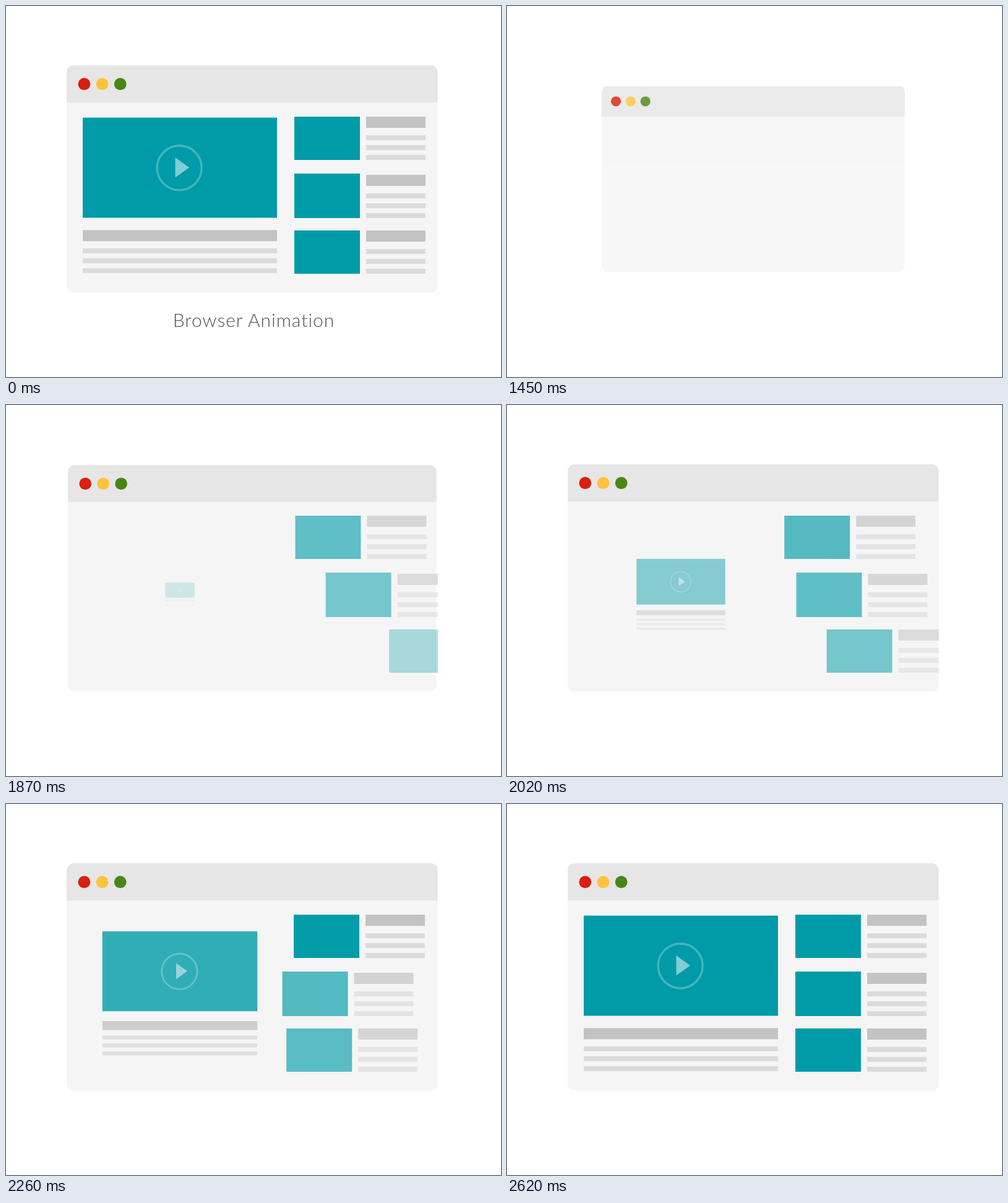
Write an HTML page that moves like this. It is 800x600 px and loops after 3650 ms.

```html
<!DOCTYPE html>
<html lang="en">
<head>
<meta charset="utf-8">
<title>Browser Animation</title>
<style>
  html, body { margin: 0; width: 100%; height: 100%; overflow: hidden; background: #fff; }
  svg { display: block; width: 800px; height: 600px; }
  .teal { fill: #009ba8; }
  .heading { fill: #c3c3c3; }
  .line { fill: #dbdbdb; }
  #title { font: 300 30px Lato, "Open Sans", sans-serif; letter-spacing: 1px; fill: #4a5248; text-anchor: middle; }
</style>
</head>
<body>
<svg viewBox="0 0 800 600">
  <clipPath id="page"><rect x="98" y="96" width="600" height="368"/></clipPath>
  <g id="browser">
    <rect x="98.2" y="96" width="599.4" height="367.6" rx="11" fill="#f5f5f5"/>
    <path d="M98.2 156V107a11 11 0 0 1 11-11H686.6a11 11 0 0 1 11 11V156Z" fill="#e6e6e6"/>
    <circle cx="126.4" cy="126.2" r="9.9" fill="#d91f10"/>
    <circle cx="155.5" cy="126.2" r="9.9" fill="#ffc23c"/>
    <circle cx="184.7" cy="126.2" r="9.9" fill="#488714"/>
  </g>
  <g id="video">
    <rect class="teal" x="124" y="180.5" width="314" height="162"/>
    <circle cx="280.2" cy="261.8" r="36" fill="none" stroke="#fff" stroke-opacity=".26" stroke-width="3.4"/>
    <path d="M273.5 245V277.5L296 261.2Z" fill="#fff" fill-opacity=".5"/>
  </g>
  <g id="list" clip-path="url(#page)"></g>
  <text id="title" x="400.5" y="519">Browser Animation</text>
</svg>
<script>
const LOOP = 3650, START = 1000, END = 2620, STEP = 30;
const $ = id => document.getElementById(id);
const [browser, video, list, title] = ['browser', 'video', 'list', 'title'].map($);

function add(parent, tag, attrs = {}) {
  const node = document.createElementNS('http://www.w3.org/2000/svg', tag);
  for (const name in attrs) node.setAttribute(name, attrs[name]);
  return parent.appendChild(node);
}

function addRect(parent, kind, x, y, width, height) {
  add(parent, 'rect', { class: kind, x, y, width, height });
}

// A heading bar with three text lines below it
function addText(parent, x, y, width, gap) {
  addRect(parent, 'heading', x, y, width, 18);
  for (let i = 0; i < 3; i++) addRect(parent, 'line', x, y + gap + 16 * i, width, 8);
}

addText(video, 124, 362.4, 314, 29.6);
const items = [[179, 70, 179], [271, 72, 273], [363, 70, 363]].map(([y, height, textY]) => {
  const item = add(list, 'g');
  addRect(item, 'teal', 466, y, 106, height);
  addText(item, 582, textY, 96, 30);
  return item;
});

// cubic-bezier(.25, .1, .25, 1), solved by bisection
function ease(x) {
  if (x <= 0) return 0;
  if (x >= 1) return 1;
  const curve = (s, a, b) => 3 * s * (1 - s) ** 2 * a + 3 * s * s * (1 - s) * b + s ** 3;
  let low = 0, high = 1;
  for (let i = 0; i < 24; i++) {
    const mid = (low + high) / 2;
    if (curve(mid, .25, .25) < x) low = mid; else high = mid;
  }
  return curve(low, .1, 1);
}

function zoom(node, amount, cx, cy) {
  node.setAttribute('transform', `translate(${cx} ${cy}) scale(${amount}) translate(${-cx} ${-cy})`);
  node.setAttribute('opacity', amount);
}

// Slides in from the right, overshoots by 20px, then settles
function slide(node, t) {
  const enter = ease((t - 1355) / 745), settle = ease((t - 2100) / 220);
  node.setAttribute('transform', `translate(${320 - 340 * enter + 20 * settle} 0)`);
  node.setAttribute('opacity', .65 * enter + .35 * settle);
}

function render(time) {
  const resting = time < START || time >= END;
  const t = resting ? 1e4 : START + Math.floor((time - START) / STEP) * STEP;
  zoom(browser, ease((t - 875) / 1116), 398, 280);
  zoom(video, ease((t - 1727) / 1076), 281, 306.2);
  items.forEach((item, i) => slide(item, t - 150 * i));
  title.style.display = time < START ? '' : 'none';
}

function tick() {
  render(performance.now() % LOOP);
  requestAnimationFrame(tick);
}
tick();
</script>
</body>
</html>
```
